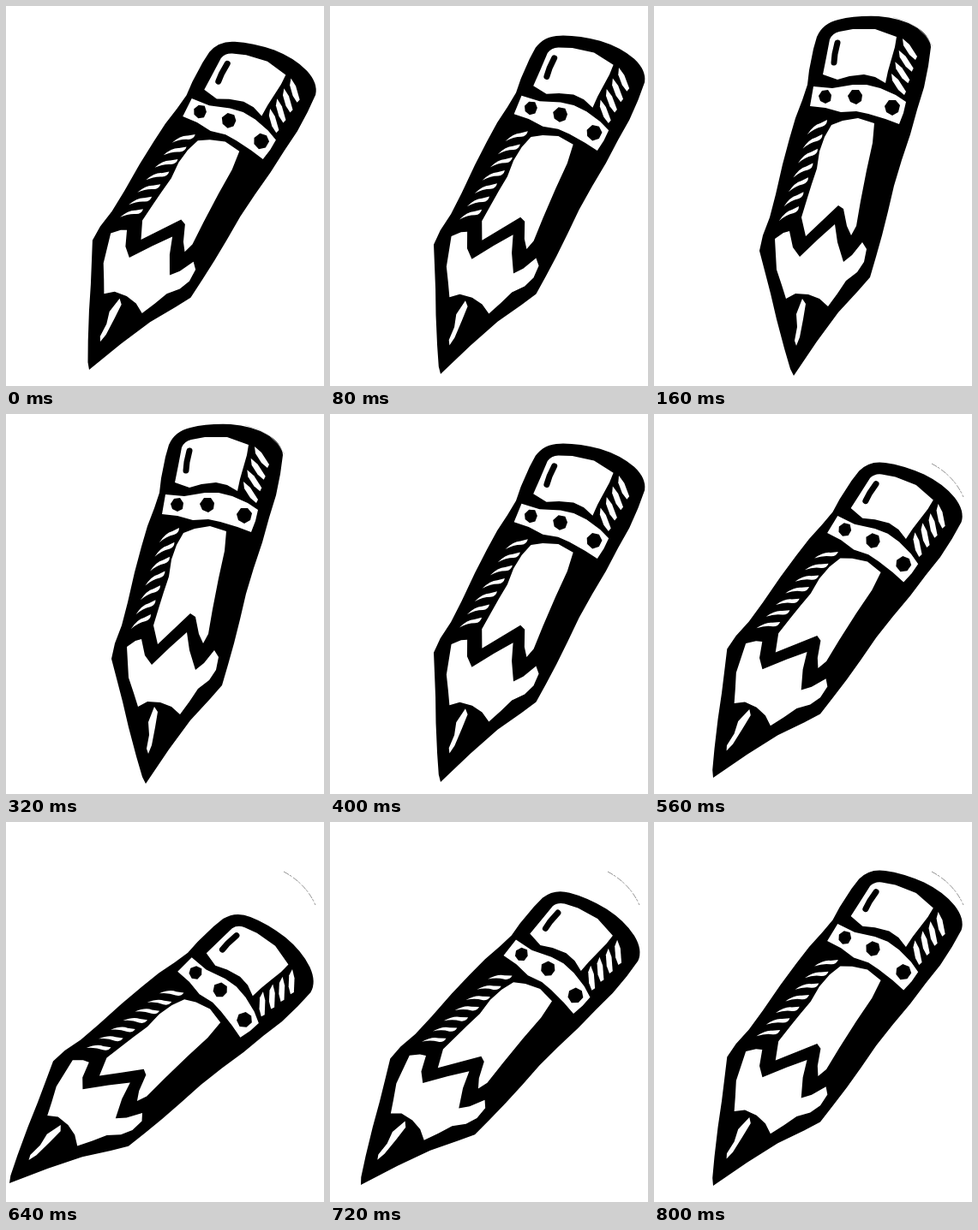
An HTML page that plays this animation: 371 px wide and 444 px high, repeating every 880 ms.

```html
<!DOCTYPE html>
<html lang="en">
<head>
<meta charset="utf-8">
<title>Pencil</title>
<style>
  html, body { margin: 0; width: 100%; height: 100%; overflow: hidden; background: #fff; }
  svg { display: block; width: 100vw; height: 100vh; }
  .ink { fill: #000; }
  .paper { fill: #fff; }
  .line { fill: none; stroke: #000; stroke-linecap: round; stroke-linejoin: round; }
</style>
</head>
<body>
<svg viewBox="0 0 371 444">
  <!-- drawn with the pencil tip at 163,432 -->
  <g id="pencil">
    <path class="ink" d="M163 432L159 424 152 400 143 366 136 336 129 309 123 286 127 268 135 247 142 220 150 185 158 155 165 131 173 110 179 92 181 75 186 50 190 36Q197 20 215 16 235 11 262 12 287 14 305 24 322 34 323 48L320 70 315 95 307 121 299 150 289 180 280 210 273 240 266 268 259 293 252 317 238 333 215 358 190 392Z"/>
    <path class="paper" d="M197 80L201 60 205 39Q208 32 216 30L232 27 258 27 283 36 281 48 277 62 273 76 270 90 258 83 245 80 228 82 214 86Z"/>
    <path class="line" stroke-width="7" d="M214 43L211 56 210 66"/>
    <path class="paper" d="M186 94L208 96 232 92 248 92 264 96 282 104 294 112 291 125 286 138 270 132 250 126 236 123 218 124 200 119 182 117Z"/>
    <path class="ink" d="M196 99L203 98 207 104 206 111 200 114 194 111 192 105ZM231 98L239 98 243 104 242 111 236 115 229 112 226 105ZM274 110L282 110 287 116 285 124 278 128 271 124 269 117Z"/>
    <path class="paper" d="M207 139L220 134 238 131 257 137 255 160 248 192 241 228 236 257 230 268 225 257 221 237 215 233 196 251 177 269 172 247 179 224 184 208 190 190 193 170 199 153Z"/>
    <g id="cuts" class="paper"></g>
    <path class="paper" d="M141 272L151 265 158 263 162 282 170 293 192 272 211 255 214 276 221 299 231 291 243 276 248 284 245 299 237 311 224 321 214 336 203 351 193 342 180 337 165 336 154 342 149 326 143 308Z"/>
    <path class="paper" d="M173 342L177 348 174 366 170 387 166 397 164 391 167 375 166 360Z"/>
  </g>
  <path id="upright" fill="none" stroke="#ccc" stroke-width=".7" d="M279 13Q313 21 325 47"/>
  <path id="speck" fill="none" stroke="#777" stroke-width=".8" stroke-dasharray="7 1 3 2" d="M324 58Q350 72 361 97"/>
</svg>
<script>
  const STEP = 80;
  // tip x, tip y, turn in degrees
  const lean = [97, 425, 16.8], steep = [129, 430, 12.3], upright = [163, 432, 0], far = [193, 436, -9],
        slant = [69, 425, 21.5], low = [4, 422, 35], rise = [36, 424, 28.4];
  const poses = [lean, steep, upright, far, upright, steep, lean, slant, low, rise, slant];
  const $ = id => document.getElementById(id);

  // a row of equal cuts from one point to another
  const row = (n, x0, y0, x1, y1, shape) => Array.from({ length: n }, (_, i) => {
    const k = i / (n - 1);
    return `<path d="M${x0 + (x1 - x0) * k} ${y0 + (y1 - y0) * k}${shape}z"/>`;
  }).join('');

  $('cuts').innerHTML =
    row(7, 179, 150, 146, 251, 'q7-11 15-13l8-4q0 6-6 8-9 2-17 9') +
    row(4, 290, 38, 277, 79, 'l8 7 9 14-2 4-7-6-7-11');

  let shown = -1;
  function draw() {
    const i = Math.floor(performance.now() / STEP) % poses.length;
    if (i !== shown) {
      shown = i;
      const [x, y, turn] = poses[i];
      $('pencil').setAttribute('transform', `translate(${x} ${y}) rotate(${turn}) translate(-163 -432)`);
      $('upright').style.display = poses[i] === upright ? '' : 'none';
      $('speck').style.display = i >= 7 ? '' : 'none';
    }
    requestAnimationFrame(draw);
  }
  draw();
</script>
</body>
</html>
```
